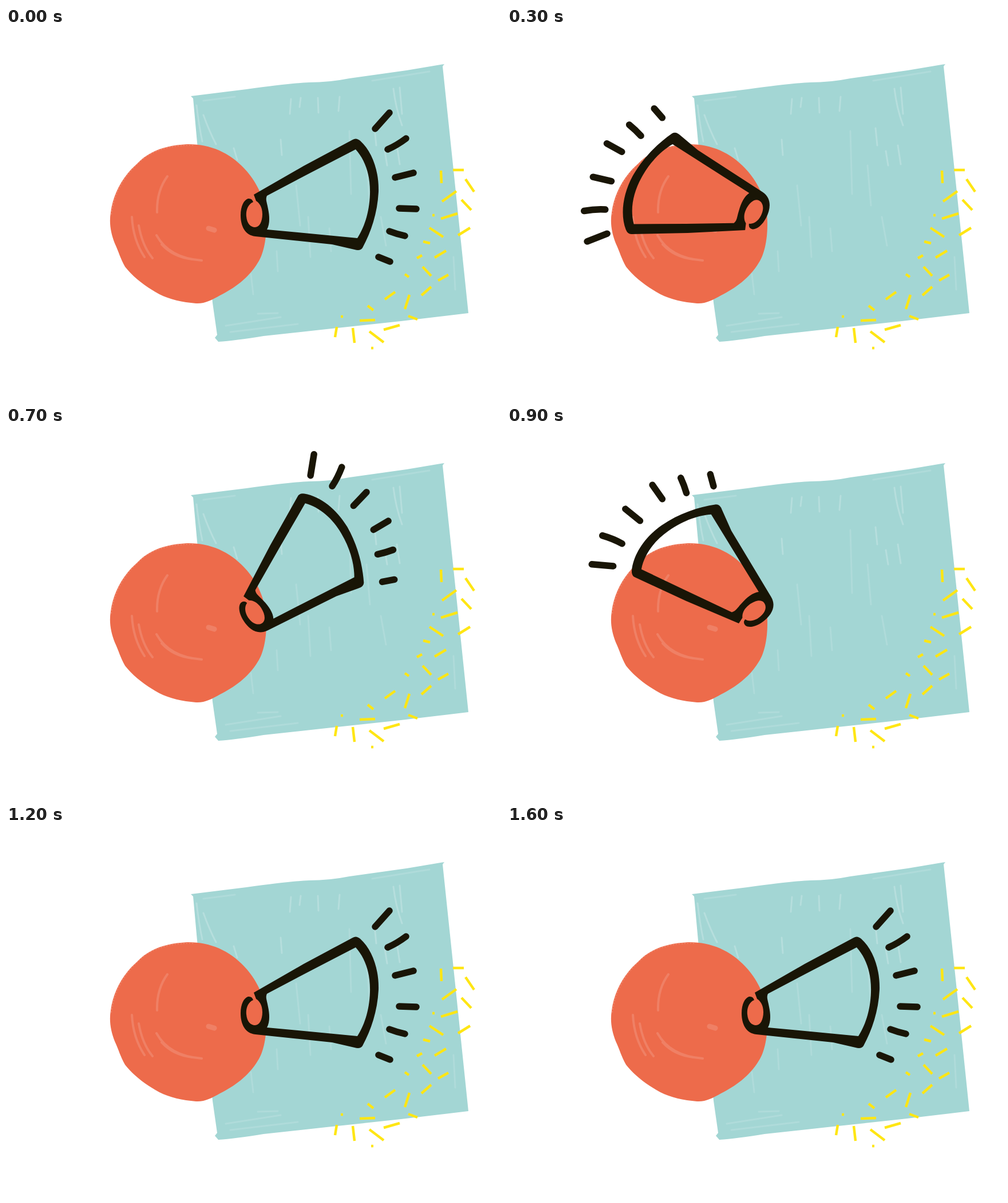
Recreate the animation shown at these times as an HTML page without scripts. Size 865 px wide and 648 px high, loop 1.65 s.

```html
<!DOCTYPE html>
<html lang="en">
<head>
<meta charset="utf-8">
<title>Spinning megaphone</title>
<style>
  html, body { margin: 0; width: 100%; height: 100%; overflow: hidden; background: #fff; }
  svg { display: block; width: 100%; height: 100%; }
  path { stroke-linecap: round; stroke-linejoin: round; }
  .square { fill: #a3d6d4; }
  .disc { fill: #ed6b4b; }
  .chalk { fill: none; stroke: #fff; }
  .confetti { fill: none; stroke: #ffe614; stroke-width: 4.5; stroke-linecap: butt; }
  .ink { fill: #191506; }
  .shout { fill: none; stroke: #191506; stroke-width: 11.5; }
</style>
</head>
<body>
<svg viewBox="0 0 865 648">
  <path class="square" d="M323 119 L420 107 Q500 96 530 95 Q565 95 600 88 L700 74 L766 63 L763 67 L782 248 L808 498 L690 512 L560 526 L450 538 Q400 546 371 548 L365 541 L369 536 L361 480 L334 200 L327 123 Z"/>
  <g class="chalk">
    <path opacity=".2" stroke-width="3" d="M333 135 Q337 170 343 198 M345 152 Q355 180 367 203 M398 210 L404 230 M498 124 L496 150 M515 122 L513 138 M545 122 L546 148 M583 120 L581 145 M677 106 Q681 140 692 170 M688 104 L692 150 M644 175 L647 205 M662 215 L666 240 M683 205 L688 238 M480 195 L482 222"/>
    <path opacity=".13" stroke-width="3" d="M507 275 L514 345 M528 330 L532 400 M565 350 L568 390 M630 240 L636 310 M655 330 L664 380 M473 390 L475 425 M428 430 L432 465 M600 180 L603 290 M782 400 L785 457 M384 520 L480 505 M392 531 L510 517 M440 499 L475 498 M640 92 L740 76 M345 127 L400 120"/>
  </g>
  <path class="disc" d="M316 203 C355 202 390 217 416 245 C440 270 456 305 455 344 C455 372 449 397 440 410 C424 437 398 455 374 467 C360 475 347 482 332 481 C308 479 286 474 268 465 C244 452 222 435 208 417 C200 403 197 391 190 376 C183 358 180 341 183 322 C187 290 204 259 228 238 C250 214 280 205 316 203 Z"/>
  <g class="chalk" opacity=".14">
    <path stroke-width="4" d="M282 259 Q263 285 264 322 M220 330 Q222 370 242 400 M232 345 Q238 380 256 402 M263 362 Q285 402 342 406 M272 378 Q292 400 325 404"/>
    <path stroke-width="9" d="M354 350 L364 353"/>
    <path stroke-width="2" stroke-dasharray="1 4" d="M184 325 Q192 265 245 224 Q280 203 330 205"/>
  </g>
  <path class="confetti" d="M781 248h19 M803 264l15 22 M760 249l1 22 M762 303l25 -18 M796 300l17 18 M760 333l29 -9 M790 362l21 -13 M740 349l24 16 M745 327h4 M729 373l12 3 M749 401l20 -12 M718 402l9 -5 M728 417l15 16 M755 441l18 -10 M697 430l7 5 M726 467l17 -15 M662 474l18 -13 M697 491l8 -25 M632 485l10 8 M618 511l27 -1 M703 503l16 6 M660 527l28 -8 M635 530l25 19 M606 524l3 26 M575 540l3 -18 M585 504h4 M638 559h4"/>
  <g transform="translate(432 324)">
    <g>
      <!-- seven counter-clockwise turns, 50 ms per pose, then a rest -->
      <animateTransform attributeName="transform" type="rotate" dur="1.65s" repeatCount="indefinite" calcMode="discrete"
        values="0;-18;-69;-156.5;-261;-381;-513;-662;-828;-1000;-1173.5;-1347;-1505;-1657;-1832.5;-1968;-2085;-2193;-2287;-2370;-2432;-2473;-2503;-2517;0;0;0;0;0;0;0;0;0"/>
      <g transform="translate(-432 -324)">
        <path class="ink" fill-rule="evenodd" d="M433 291 L520 241 L606 195 Q612 191 619 197 C640 216 652 250 651 286 C649 324 638 356 623 384 Q619 390 609 387 L570 378 L436 364 C417 362 410 345 410 327 C410 311 416 300 423 298 Q430 297 432 304 C422 308 419 320 420 329 C421 342 428 348 435 348 C443 348 448 338 448 325 C448 312 442 305 437 302 Z
          M456 293 L530 254 L611 212 C629 232 637 260 636 290 C635 324 625 350 614 367 L510 357 L456 352 C461 343 461 330 458 316 C456 304 453 300 456 293 Z"/>
        <path class="shout" d="M645 176 L670 148 M667 212 Q683 205 699 193 M680 261 L712 253 M687 315 L717 316 M670 355 Q683 360 697 363 M651 400 L671 408"/>
      </g>
    </g>
  </g>
</svg>
</body>
</html>
```
